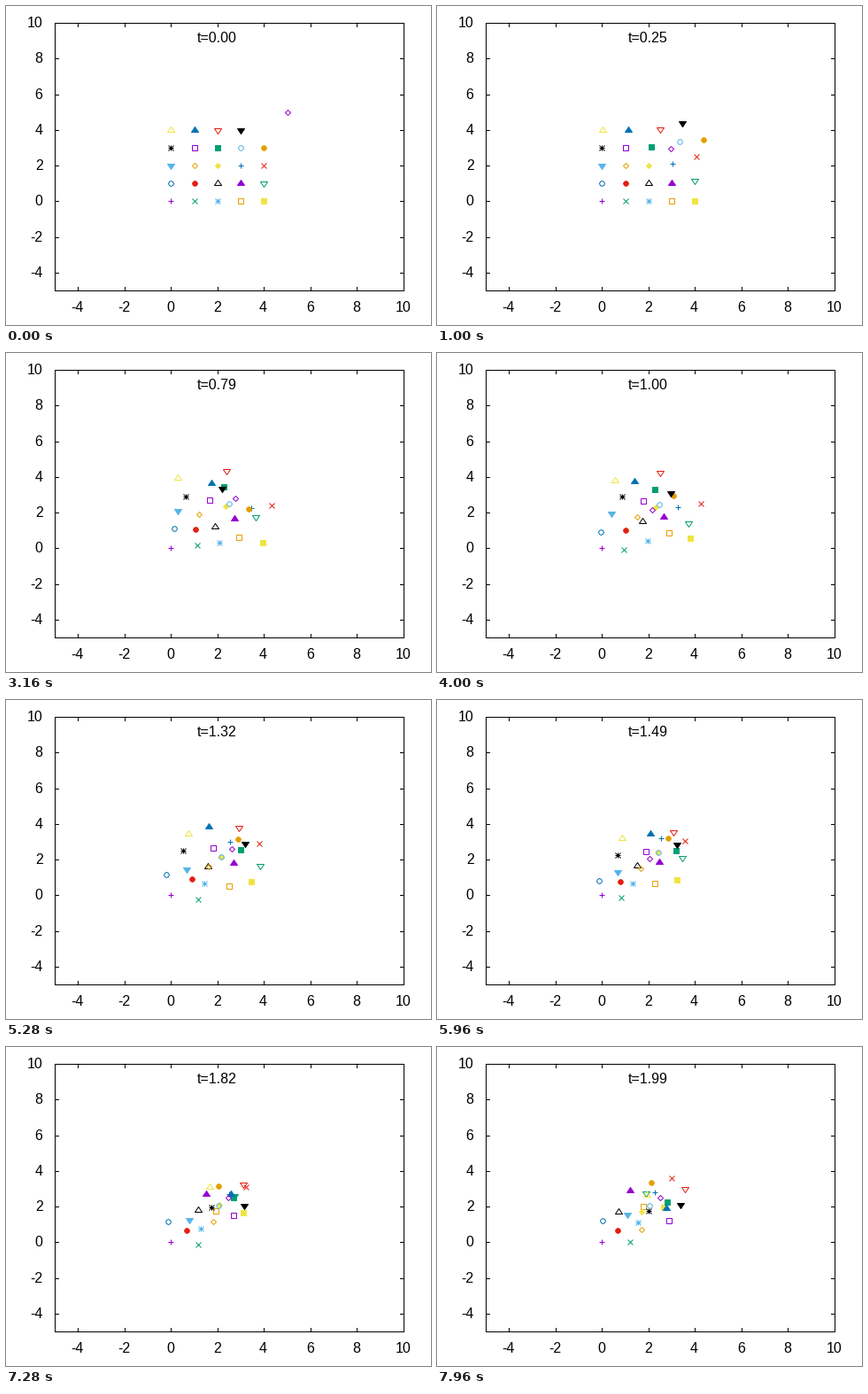
Animation of 480x360 px, one loop 8 s. Source, as a matplotlib script:

```python
import numpy as np
import matplotlib.pyplot as plt
from matplotlib.animation import FuncAnimation
from matplotlib.path import Path

W, H, DPI = 480, 360, 100
PX = 72 / DPI
LEFT, RIGHT, TOP, BOTTOM = 55, 449, 19, 321
LO, HI = -5, 10
FRAMES, INTERVAL = 200, 40
DT = 0.01
N, STIFFNESS, REST = 5, 100.0, 1.0

COLORS = ["#9400d3", "#009e73", "#56b4e9", "#e69f00",
          "#f0e442", "#0072b2", "#e51e10", "#000000"]


def to_px(p):
    """Data coordinates to whole pixels, y pointing down."""
    scale = np.array([RIGHT - LEFT, TOP - BOTTOM]) / (HI - LO)
    return np.round([LEFT, BOTTOM] + (np.asarray(p) - LO) * scale)


# --- square sheet of masses joined by springs, first mass pinned ---
def springs():
    idx = np.arange(N * N).reshape(N, N)
    a = np.concatenate([idx[:, :-1].ravel(), idx[:-1].ravel()])
    b = np.concatenate([idx[:, 1:].ravel(), idx[1:].ravel()])
    return a, b


A, B = springs()
LINK = np.zeros((N * N, len(A)))
LINK[A, np.arange(len(A))] = 1
LINK[B, np.arange(len(A))] = -1
LINK[0] = 0


def accel(pos):
    d = pos[B] - pos[A]
    length = np.maximum(np.hypot(d[:, 0], d[:, 1]), 1e-9)[:, None]
    return LINK @ (STIFFNESS * (length - REST) * d / length)


def simulate():
    y, x = np.divmod(np.arange(N * N), N)
    pos = np.stack([x, y], axis=1).astype(float)
    pos[-1] = 5, 5
    vel = np.zeros_like(pos)
    track = [pos.copy()]
    for _ in range(FRAMES - 1):
        pos += vel * DT
        vel += accel(pos) * DT
        track.append(pos.copy())
    return to_px(track)


# --- point symbols, sizes in pixels ---
def strokes(*segs):
    pts = [p for s in segs for p in s]
    return Path(pts, [Path.MOVETO, Path.LINETO] * len(segs))


def polygon(*pts):
    return Path(list(pts) + [pts[0]], closed=True)


PLUS = [((-3, 0), (3, 0)), ((0, -3), (0, 3))]
CROSS = [((-3, -3), (3, 3)), ((-3, 3), (3, -3))]
SQUARE = polygon((-3, -3), (3, -3), (3, 3), (-3, 3))
DISC = polygon((3, 0), (2, 2), (0, 3), (-2, 2),
               (-3, 0), (-2, -2), (0, -3), (2, -2))
UP = polygon((0, 4), (-4, -2), (4, -2))
DOWN = polygon((0, -4), (-4, 2), (4, 2))
DIAMOND = polygon((0, 3), (3, 0), (0, -3), (-3, 0))
SHAPES = [(strokes(*PLUS), False), (strokes(*CROSS), False),
          (strokes(*PLUS, *CROSS), False)]
SHAPES += [(s, f) for s in (SQUARE, DISC, UP, DOWN, DIAMOND)
           for f in (False, True)]

fig = plt.figure(figsize=(W / DPI, H / DPI), dpi=DPI, facecolor="white")
ax = fig.add_axes([0, 0, 1, 1])
ax.set_xlim(0, W)
ax.set_ylim(H, 0)
ax.axis("off")

FONT = dict(family="Liberation Sans", size=16 * PX, color="black",
            va="baseline")


def line(xs, ys):
    ax.plot(xs, ys, color="black", lw=PX, solid_capstyle="projecting",
            antialiased=False, snap=True)


line([LEFT, RIGHT, RIGHT, LEFT, LEFT], [TOP, TOP, BOTTOM, BOTTOM, TOP])
for v in range(-4, HI + 1, 2):
    x, y = to_px([v, v])
    for edge, step in ((BOTTOM, -4), (TOP, 4)):
        line([x, x], [edge, edge + step])
    for edge, step in ((LEFT, 4), (RIGHT, -4)):
        line([edge, edge + step], [y, y])
    ax.text(x - 0.5, 345, str(v), ha="center", **FONT)
    ax.text(41.5, y + 5, str(v), ha="right", **FONT)

clock = ax.text(238, 41, "", ha="center", **FONT)

points = []
for i in range(N * N):
    shape, filled = SHAPES[i % len(SHAPES)]
    color = COLORS[i % len(COLORS)]
    size = 2 * np.abs(shape.vertices).max() * PX
    points += ax.plot([], [], ls="", marker=shape, ms=size, mew=PX,
                      mec=color, mfc=color if filled else "none",
                      antialiased=False, snap=True)

track = simulate()


def draw(i):
    clock.set_text(f"t={i * DT:.2f}")
    for point, (x, y) in zip(points, track[i]):
        point.set_data([x], [y])
    return [clock, *points]


anim = FuncAnimation(fig, draw, frames=FRAMES, interval=INTERVAL,
                     repeat=True, repeat_delay=0, blit=False)
plt.show()
```
